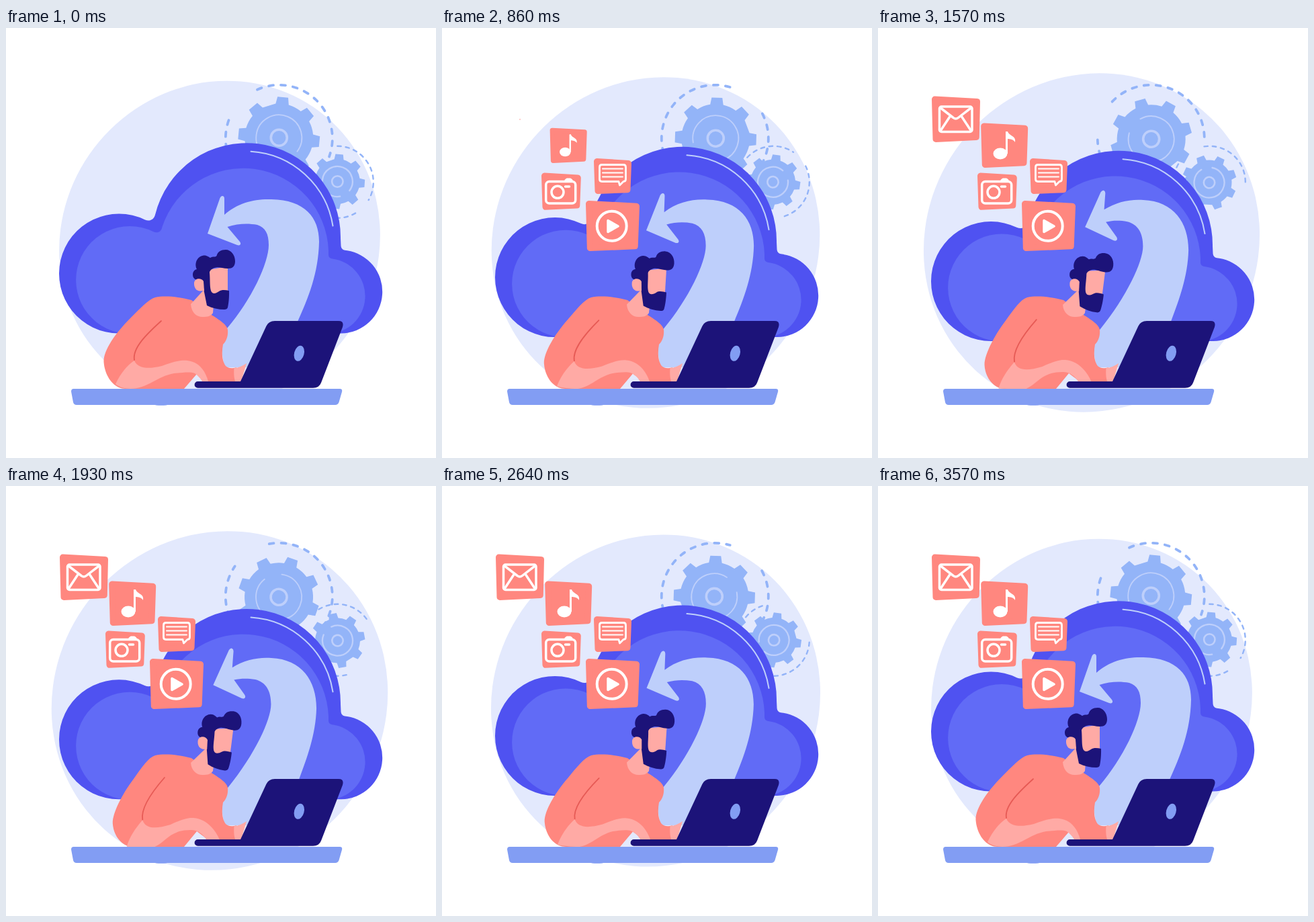
Animation, 640 px wide and 640 px high, one loop 3.64 s. Source, as an HTML page:

```html
<!DOCTYPE html>
<html lang="en">
<head>
<meta charset="utf-8">
<title>Cloud upload</title>
<style>
html, body { margin: 0; width: 100%; height: 100%; overflow: hidden; background: #fff; }
svg { display: block; width: 100vw; height: 100vh; }
.line { fill: none; stroke-linecap: round; stroke-linejoin: round; }
.tile { fill: #ff877f; stroke: #ff877f; stroke-width: 9; stroke-linejoin: round; }
.icon { fill: none; stroke: #fff; stroke-width: 3.5; stroke-linecap: round; stroke-linejoin: round; }
.solid { fill: #fff; stroke: none; }
</style>
</head>
<body>
<svg viewBox="0 0 640 640">
  <ellipse id="disc" rx="245.5" ry="234.1" fill="#e3e9fd"/>
  <g id="gears"></g>

  <g id="cloud">
    <path fill="#4f52f1" d="M168,454.5 A89,89 0 1 1 207,285.5 C213,288 220,286 222,278 A140,140 0 0 1 498,313 L498.5,324 C499,329 502,330.500 506,331 A62,62 0 0 1 499,454.500 Z"/>
    <path fill="#616bf6" d="M185,455 A80,80 0 1 1 219,303 C225,306 231,304 232.500,296 A127,127 0 0 1 480,331 L480,337 C480,341 482,343 486,343.500 A56,56 0 0 1 479,455 Z"/>
    <path class="line" stroke="#becffb" stroke-width="2" d="M364.500,183.700 A132,132 0 0 1 486.500,294.500"/>
  </g>

  <path id="arrow" fill="#becffb"/>

  <g id="tiles">
    <g>
      <path class="tile" d="M218.500,261.500 L289.500,265.200 L287.200,324.800 L220.300,327.500Z"/>
      <circle class="icon" cx="252.700" cy="294.800" r="22" style="stroke-width:4"/>
      <path class="icon" style="fill:#fff" d="M247,286.500 V303.500 L262,295Z"/>
    </g>
    <g>
      <path class="tile" d="M152.500,220 L202.300,223 L200.800,264 L154,266.300Z"/>
      <rect class="icon" x="154.700" y="228.500" width="44" height="32.500" rx="5"/>
      <circle class="icon" cx="172" cy="244.300" r="9"/>
      <path class="icon" d="M184,227 L186,225.300 H191 L193,227 M183.500,236 H189.500"/>
    </g>
    <g>
      <path class="tile" d="M230.500,198.500 L277.500,201.500 L276,240.700 L232,242.500Z"/>
      <path class="icon" style="stroke-width:2.800" d="M238,203.500 H270 Q273.500,203.500 273.500,207 V225 Q273.500,228.500 270,228.500 L264.500,234 L263,228.500 H238 Q234.500,228.500 234.500,225 V207 Q234.500,203.500 238,203.500Z"/>
      <path class="icon" style="stroke-width:2" d="M239,209.500 H269 M239,215.500 H269 M239,221.500 H269"/>
    </g>
    <g>
      <path class="tile" d="M157.700,146 L218.700,149.300 L217,200.700 L159.300,203.500Z"/>
      <ellipse class="solid" cx="182" cy="187" rx="10.500" ry="8.500"/>
      <path class="icon" style="stroke-width:3;stroke-linecap:butt" d="M191.500,187 V154"/>
      <path class="solid" d="M190.500,154 H193 C195,161 206,160 204,170 C201.500,165.500 197,165.500 192,165Z"/>
    </g>
    <g>
      <path class="tile" d="M84.500,106 L147.500,109.500 L146.300,162.500 L86,165.500Z"/>
      <rect class="icon" x="91.500" y="117" width="48.500" height="37.500" rx="3"/>
      <path class="icon" d="M92.500,118.500 L112,133.500 Q115.700,136.500 119.500,133.500 L139,118.500 M93,153 L107.500,131 M138.500,153 L124,131"/>
    </g>
  </g>

  <path id="shirt" fill="#ff877f"/>
  <path id="sleeve" class="line" stroke="#e65a55" stroke-width="1.800"/>
  <path id="arm" fill="#ffaaa5"/>
  <path fill="#ffaaa5" d="M339.500,506.300 C346,506 352,503 358,499 L350,526 H341 C339,519 339,512 339.500,506.300Z"/>
  <path id="neck" fill="#ffaaa5"/>
  <g id="head">
    <path fill="#ffaaa5" d="M300,360 L330,355 V394 L316,400 L302,395Z"/>
    <path fill="#1c1379" d="M299,413 L294,388 C294,380 293,374 288,374 C284,376 278,374 278,367 C278,363 280,360 284,359 C280,351 284,340 294,338.500 C299,338 302,341 304,342 C308,339 312,342 313.500,339 C315,333 320,330 327,330 C335,330 341,338 341,347 C341,355 337,358 330,358 C322,358 316,355 310,357 C305,359 303,362 303,364 C304,376 303,384 305,391 C307,397 313,395 317,392 C321,389 327,390 332,391 C332.300,400 331.500,410 330,416 Q329,419 325,419 C316,419 307,417 299,413Z"/>
    <path fill="#ffaaa5" d="M294,377 C291,371.500 281,372 280,379 C279.500,386 283,391.500 289,391.500 L295,391Z"/>
  </g>

  <ellipse cx="231" cy="560.500" rx="10" ry="1.300" fill="#829df3"/>
  <path fill="#829df3" d="M97,541 Q97,537 100.500,537 H497 Q501,537 500,541.500 L495.500,557 Q494,561 490,561 H105 Q101,561 100,557Z"/>
  <path fill="#1c1379" d="M285.500,526 H349 L387.500,443.500 Q391,436 400,436 H495 Q503.500,436 501,445 L469,528 Q466,535.800 457,535.800 H285.500 A4.900,4.900 0 0 1 285.500,526Z"/>
  <ellipse cx="436.300" cy="484.300" rx="7.300" ry="11.800" fill="#829df3" transform="rotate(15 436.300 484.300)"/>
</svg>
<script>
const $ = id => document.getElementById(id);
const LOOP = 3640, STEPS = 50, FPMS = 0.014;

// Point at an angle in degrees, clockwise from the top.
const polar = (r, deg) => {
  const a = deg * Math.PI / 180;
  return (r * Math.sin(a)).toFixed(2) + ',' + (-r * Math.cos(a)).toFixed(2);
};
const arc = (r, from, to) =>
  `M${polar(r, from)} A${r},${r} 0 ${to - from > 180 ? 1 : 0} 1 ${polar(r, to)}`;

function cog(tip, root, tipHalf, rootHalf, first) {
  let d = '';
  for (let i = 0; i < 8; i++) {
    const a = first + i * 45;
    d += `${i ? 'A' + root + ',' + root + ' 0 0 1 ' : 'M'}${polar(root, a - rootHalf)} ` +
      `L${polar(tip, a - tipHalf)} L${polar(tip, a + tipHalf)} L${polar(root, a + rootHalf)} `;
  }
  return d + 'Z';
}

const gears = [
  { x: 406.3, y: 164.3, dir: 1, shape: cog(61, 51, 7.5, 11, 5.5), off: -1,
    ring: 79.5, arcs: [[-24, 110], [155, 291]], dash: '7 11', ringW: 3.8,
    inner: 34, gap: [173, 487], innerW: 1.8, hub: 12, hubW: 3.6 },
  { x: 493.3, y: 229.3, dir: -1, shape: cog(41, 33.5, 8, 12, 4), off: -0.8,
    ring: 53.5, arcs: [[0, 120], [150, 252]], dash: '5.5 6.8', ringW: 2.4,
    inner: 22.5, gap: [170, 487], innerW: 2.3, hub: 8.2, hubW: 2.6 }
];

$('gears').innerHTML = gears.map(g => `<g>
  <path class="line" stroke="#93b4f8" stroke-width="${g.ringW}" stroke-dasharray="${g.dash}"
    d="${g.arcs.map(a => arc(g.ring, ...a)).join(' ')}"/>
  <g transform="translate(0 ${g.off})">
    <path fill="#93b4f8" d="${g.shape}"/>
    <path class="line" stroke="#becffb" stroke-width="${g.innerW}" d="${arc(g.inner, ...g.gap)}"/>
    <circle class="line" stroke="#becffb" stroke-width="${g.hubW}" r="${g.hub}"/>
  </g></g>`).join('');

// Each shape has a rest pose and a bent pose with matching commands.
const poses = {
  arrow: [
    'M300,306 L318.5,253 Q320,249.5 322.5,250 Q325,250.5 325,254 L325,278 C345,260 370,254 395,255 C445,256 466,282 466,318 C465,365 450,402 434,437 L385,505 L325,505 L318,461 L329,447 C365,405 391,350 391,323 C391,306 386,297 374,293 C360,290.5 345,291 329.500,296 L348,318 Q350,321 348.500,322.500 Q347,324 344,323Z',
    'M308.500,296 L332,244 Q334,241 336.500,241.500 Q339,242.500 338.800,246 L337,270 C355,259 375,254.500 395,256 C440,258 462,290 462,331 C461,370 448,405 436,437 L385,505 L325,505 L318,463 L331,448 C370,400 394.500,348 394.500,325 C394.500,305 387,292 371,288 C360,286 350,286 339.500,288.500 L355.500,311 Q357,314 355.500,315.500 Q354,317 351,316Z'
  ],
  shirt: [
    'M222,401 C236,398 258,400 276,405 L306,427 C315,433 329,441 330,449 C331,458 328,466 323,471 C321,482 321,495 327,503 C332,508 340,506 343,505 L341,526 L300,526 L284,515 L265,537 L178,537 C160,537 147,518 145.500,497 C145,480 162,455 185,432 C200,417 212,404 222,401Z',
    'M222,401 C236,398 258,400 276,405 L306,427 C315,433 329,441 330,449 C331,458 328,466 323,471 C321,482 321,495 327,503 C332,508 340,506 343,505 L341,526 L300,526 L284,514 L265,537 L190,537 C172,537 160,520 159,502 C158.500,488 172,460 190,436 C202,419 212,404 222,401Z'
  ],
  sleeve: [
    'M231,436 C210,455 188,476 191,494',
    'M236,434 C222,450 200,478 203.500,497'
  ],
  arm: [
    'M191,495 C196,507 212,508 232,503 C250,496 262,494 270,495 C286,497 296,508 301,526 L292,526 C289,521 286,518 281,514 C274,511 262,513 250,514 C226,518 210,537 185,537 C176,537 168,534 163,530 C170,515 180,502 191,495Z',
    'M203.500,497 C207,510 222,511 245,504 C258,498 270,493 279,494 C296,495 310,508 318,526 L298,526 C294,519 289,516 284,513.500 C277,511 266,512 258,514 C240,520 236,530 222,537 C205,537 190,537 180,537 C184,522 194,508 203.500,497Z'
  ],
  neck: [
    'M296,388 L275,411 C276,424 284,430 292,430 C300,430 305,429 308,424 L310,400Z',
    'M300,388 L275,412 C276,424 284,430 292,430 C300,430 305,429 308,424 L311,402Z'
  ]
};

function mix(a, b, k) {
  const end = b.match(/[\d.]+/g);
  let i = 0;
  return a.replace(/[\d.]+/g, v => (+v + (end[i++] - v) * k).toFixed(2));
}

const clamp = v => Math.max(0, Math.min(1, v));
const ease = v => v * v * (3 - 2 * v);

const tiles = [...$('tiles').children];
const centers = [[254, 295], [177.5, 243], [254, 220.5], [188, 175], [116, 136]];

function draw(ms) {
  const n = Math.min(STEPS, Math.floor((ms + 5) * FPMS));
  const k = (1 - Math.cos(2 * Math.PI * n / STEPS)) / 2;

  $('disc').setAttribute('transform',
    `translate(318 319.500) rotate(-50) scale(${1 + 0.0485 * k})`);
  $('cloud').setAttribute('transform', `translate(0 ${12 * k})`);
  $('head').setAttribute('transform', `rotate(${7.3 * k} 290 425)`);
  for (const id in poses) $(id).setAttribute('d', mix(...poses[id], k));

  gears.forEach((g, i) => $('gears').children[i].setAttribute('transform',
    `translate(${g.x} ${g.y}) rotate(${g.dir * 360 * n / STEPS})`));

  tiles.forEach((tile, i) => {
    const s = ease(clamp((n - i * 2.9) / 4.7));
    const [x, y] = centers[i];
    tile.setAttribute('visibility', s > 0 ? 'visible' : 'hidden');
    tile.setAttribute('transform', `translate(${x} ${y}) scale(${s}) translate(${-x} ${-y})`);
  });
}

let start;
function tick(now) {
  if (start === undefined) start = now;
  draw((now - start) % LOOP);
  requestAnimationFrame(tick);
}
draw(0);
requestAnimationFrame(tick);
</script>
</body>
</html>
```
